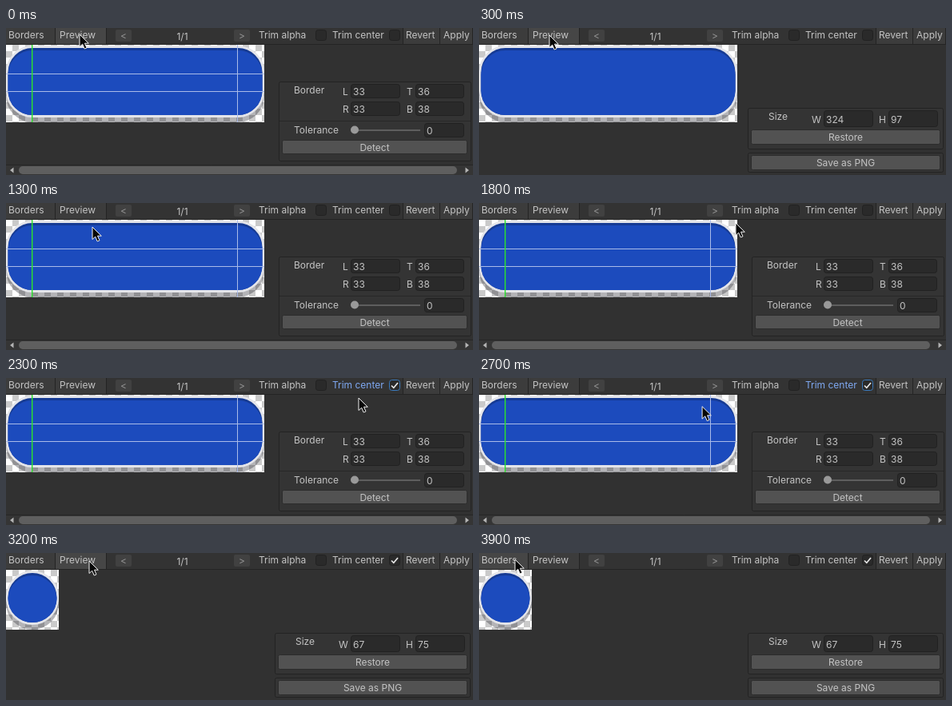
Write an HTML page that moves like this. It is 584 by 184 pixels and loops after 4000 ms.

```html
<!DOCTYPE html>
<html lang="en">
<head>
<meta charset="utf-8">
<title>Sprite border editor</title>
<style>
  html, body { margin: 0; width: 100%; height: 100%; overflow: hidden; background: #313131; }
  svg { display: block; width: 100%; height: 100%; }
  text { font: 12px Inter, Roboto, sans-serif; fill: #c4c4c4; white-space: pre; }
  .mid { text-anchor: middle; }
  .dim { fill: #929292; }
  .focus text { fill: #7fa9f2; }
  .focus rect { stroke: #3a79bb; }
</style>
</head>
<body>
<svg id="stage" viewBox="0 0 584 184" xmlns="http://www.w3.org/2000/svg"></svg>
<script>
const LOOP = 4000, STEP = 100;

// time, x, y of the pointer tip
const PATH = [
  [0, 92, 8], [300, 88, 9], [600, 38, 9], [1000, 36, 8], [1100, 36, 8],
  [1300, 108, 30], [1500, 158, 40], [2100, 484, 10], [2200, 482, 11],
  [2300, 441, 25], [2600, 310, 40], [3000, 112, 12], [3100, 104, 10],
  [3500, 104, 10], [3900, 45, 8], [4000, 45, 8]
];

const rect = (x, y, w, h, fill, more = '') =>
  `<rect x="${x}" y="${y}" width="${w}" height="${h}" fill="${fill}" ${more}/>`;
const framed = (x, y, w, h, fill, stroke, r = 3) =>
  rect(x + .5, y + .5, w - 1, h - 1, fill, `rx="${r}" stroke="${stroke}"`);
const text = (x, y, s, cls = '') => `<text x="${x}" y="${y}" class="${cls}">${s}</text>`;
const field = (label, lx, x, y, w, h, value) =>
  (label ? text(lx, y + h / 2 + 5, label) : '') +
  framed(x, y, w, h, '#2a2a2a', '#212121') + text(x + 3, y + h / 2 + 5, value);
const button = (x, y, w, h, label) =>
  framed(x, y, w, h, '#525252', '#2c2c2c', 2) + text(x + w / 2, y + h / 2 + 4.5, label, 'mid');
const box = (x, y, w, h) => framed(x, y, w, h, '#343434', '#232323', 2);
const line = (d, color) => `<path d="${d}" stroke="${color}" fill="none"/>`;
const group = (id, body) => `<g id="${id}">${body}</g>`;

function sprite(id, w, h) {
  const body = h - 7;
  return group(id,
    rect(0, 21, w, h, 'url(#checker)') +
    rect(0, 28, w, body, '#23232c', 'rx="33" opacity=".34"') +
    rect(0, 22, w, body, '#e4e5ea', 'rx="33"') +
    rect(2.5, 25, w - 5, body - 6, '#163b94', 'rx="30.5"') +
    rect(2.5, 28, w - 5, body - 9, '#1c4bbd', 'rx="30.5"'));
}

function toolbar() {
  const check = (id, x, label, bx) => group(id,
    text(x, 13, label) + framed(bx, 2, 14, 14, '#2a2a2a', '#212121'));
  const arrow = (x, s) => rect(x, 2, 20, 15, '#414141', 'rx="2"') + text(x + 10, 14, s, 'mid dim');
  return rect(0, 0, 584, 20, '#333') +
    rect(0, 0, 61, 20, '#3c3c3c', 'id="tabA"') +
    rect(62, 0, 63, 20, '#3c3c3c', 'id="tabB"') +
    rect(497, 0, 86, 20, '#3c3c3c') +
    line('M61.5 0V20M125.5 0V20M496.5 0V20M542.5 0V20M583.5 0V20M0 20.5H584', '#242424') +
    text(3, 13, 'Borders') + text(67, 13, 'Preview') +
    arrow(137, '&lt;') + arrow(285, '&gt;') + text(220.5, 15, '1/1', 'mid') +
    check('alpha', 316, 'Trim alpha', 387) + check('center', 408, 'Trim center', 479) +
    '<path id="tick" d="M482 9.5L484.8 12.3L490 6" fill="none" stroke="#e6e6e6" stroke-width="1.7"/>' +
    text(500, 13, 'Revert') + text(547, 13, 'Apply');
}

function bordersView() {
  return group('borders',
    line('M0 57.5H323M0 79.5H323M289.5 21V118', '#a9bbe9') +
    rect(32, 21, 1.4, 97, '#2be32b') +
    box(341, 67, 241, 100) + line('M342 116.5H581', '#272727') +
    text(360, 82, 'Border') +
    field('L', 421, 431, 70, 62, 18, '33') + field('T', 501, 512, 70, 61, 18, '36') +
    field('R', 421, 431, 92, 62, 18, '33') + field('B', 501, 512, 92, 61, 18, '38') +
    text(360, 132, 'Tolerance') + rect(436, 127, 82, 2, '#5e5e5e') +
    '<circle cx="436" cy="127.5" r="5" fill="#999"/>' +
    field('', 0, 523, 119, 50, 18, '0') +
    button(345, 140, 232, 18, 'Detect') +
    rect(0, 171, 584, 13, '#353535') + line('M0 171.5H584', '#262626') +
    rect(16, 173, 548, 10, '#5f5f5f', 'rx="5"') +
    '<path d="M9.5 174.5V181.5L5 178ZM574.500 174.500V181.500L579 178Z" fill="#b4b4b4"/>');
}

function previewView() {
  return group('preview',
    box(336, 100, 245, 52) + box(336, 156, 245, 25) +
    text(362, 115, 'Size') +
    field('W', 416, 431, 103, 62, 21, '<tspan id="sizeW"/>') +
    field('H', 500, 512, 103, 62, 21, '<tspan id="sizeH"/>') +
    button(340, 127, 237, 19, 'Restore') + button(340, 159, 237, 19, 'Save as PNG'));
}

const $ = id => document.getElementById(id);
$('stage').innerHTML =
  `<defs><pattern id="checker" width="16" height="16" y="21" patternUnits="userSpaceOnUse">
    ${rect(0, 0, 16, 16, '#fff')}${rect(8, 0, 8, 8, '#cacaca')}${rect(0, 8, 8, 8, '#cacaca')}
  </pattern></defs>` +
  rect(0, 0, 584, 184, '#313131') + sprite('wide', 323, 97) + sprite('small', 66, 75) +
  bordersView() + previewView() + toolbar() +
  '<path id="pointer" d="M0 0V15.500L3.700 12.200L6.200 18L9 16.800L6.500 11.200H11.300Z" fill="#080808" stroke="#f2f2f2" stroke-width="1"/>';

const show = (id, on) => $(id).setAttribute('visibility', on ? 'visible' : 'hidden');

function pointerAt(t) {
  const i = PATH.findIndex(p => p[0] > t);
  const [t0, x0, y0] = PATH[i - 1], [t1, x1, y1] = PATH[i];
  const k = (t - t0) / (t1 - t0);
  const e = t1 - t0 > 300 ? k * k * (3 - 2 * k) : k;
  return [x0 + (x1 - x0) * e, y0 + (y1 - y0) * e];
}

function draw(ms) {
  const t = Math.floor((ms % LOOP) / STEP) * STEP;
  const trimmed = t >= 3200;
  const preview = trimmed || (t >= 200 && t < 1100);
  const [x, y] = pointerAt(t);
  const over = (a, b) => y < 20 && x >= a && x < b ? '#464646' : '#3c3c3c';

  show('borders', !preview);
  show('preview', preview);
  show('wide', !trimmed);
  show('small', trimmed);
  show('tick', t >= 2200);
  $('center').setAttribute('class', t >= 2200 && t < 3100 ? 'focus' : '');
  $('sizeW').textContent = trimmed ? 67 : 324;
  $('sizeH').textContent = trimmed ? 75 : 97;
  $('tabA').setAttribute('fill', over(0, 61));
  $('tabB').setAttribute('fill', over(62, 125));
  $('pointer').setAttribute('transform', `translate(${x} ${y})`);
}

const start = performance.now();
function tick() {
  draw(performance.now() - start);
  requestAnimationFrame(tick);
}
tick();
</script>
</body>
</html>
```
